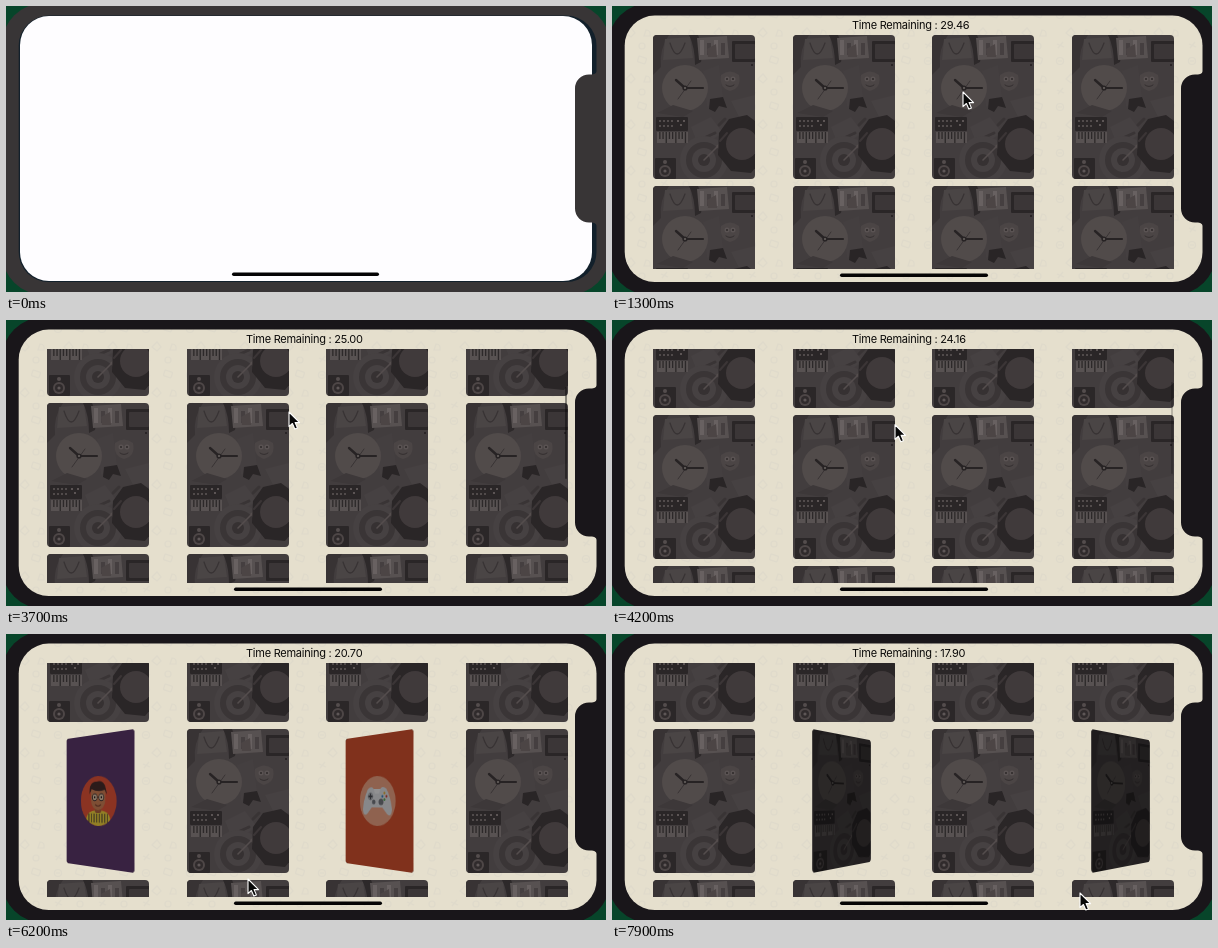
Animation, 600 px wide and 286 px high, one loop 8 s. Source, as an HTML page:

```html
<!DOCTYPE html>
<html lang="en">
<head>
<meta charset="utf-8">
<title>Memory cards</title>
<style>
html, body { margin: 0; width: 100%; height: 100%; overflow: hidden; background: #07452a; }
#stage { position: absolute; left: 0; top: 0; width: 600px; height: 286px; overflow: hidden; }
#stage > svg { position: absolute; left: 0; top: 0; }
#list { position: absolute; left: 0; top: 29px; width: 600px; height: 234px; overflow: hidden; }
#cards { position: absolute; left: 0; top: 0; }
.card { position: absolute; width: 102px; height: 144px; border-radius: 4px; overflow: hidden; }
.card svg { position: absolute; left: 0; top: 0; }
#bar { position: absolute; left: 559px; width: 2px; height: 92px; border-radius: 1px; background: #0006; }
#time { position: absolute; left: 240px; top: 12px; font: 11px/15px Inter, "Liberation Sans", sans-serif; letter-spacing: -.25px; color: #0b0a09; white-space: pre; }
</style>
</head>
<body>
<div id="stage">
  <svg width="600" height="286">
    <defs>
      <pattern id="paper" width="44" height="46" patternUnits="userSpaceOnUse">
        <rect width="44" height="46" fill="#e5dfcd"/>
        <g fill="none" stroke="#dfdacb" stroke-width="1.2">
          <circle cx="8" cy="9" r="3.5"/><path d="M6 9h4"/>
          <rect x="26" y="5" width="8" height="6" rx="1" transform="rotate(18 30 8)"/>
          <path d="M14 27l5-5 4 5-4 4z"/><path d="M34 24q5 0 4 6h-6z"/>
          <circle cx="30" cy="40" r="3"/><path d="M5 38l7 3M6 42l5-6"/>
        </g>
      </pattern>
    </defs>
    <rect id="bezel" x="-4" y="-3" width="608" height="292" rx="42"/>
    <rect id="under" x="12.7" y="9.6" width="577.8" height="266.4" rx="30"/>
  </svg>
  <div id="list"><div id="cards"></div></div>
  <div id="bar"></div>
  <div id="time"></div>
  <svg width="600" height="286">
    <rect id="white" fill="#fefdff" rx="29"/>
    <path id="notch" d="M592 62q-1 6.5-6 6.5h-3a14 14 0 0 0-14 14v120a14 14 0 0 0 14 14h3q5 0 6 6.5z"/>
    <rect id="home" height="3.4" rx="1.7" fill="#050405"/>
    <path id="cursor" d="M0 0V14.6L3.4 11.5L5.8 17L8.4 15.9L6.1 10.6H10.6Z" fill="#080808" stroke="#fff" stroke-width="1.1" stroke-linejoin="round"/>
  </svg>
</div>
<script>
const $ = id => document.getElementById(id);
const times = (n, fn) => Array.from({ length: n }, (_, i) => fn(i)).join("");
const clamp = v => Math.min(1, Math.max(0, v));
const smooth = v => v * v * (3 - 2 * v);
const disc = (x, y, r, fill) => `<circle cx="${x}" cy="${y}" r="${r}" fill="${fill}"/>`;
const box = (x, y, w, h, fill, rx = 0) => `<rect x="${x}" y="${y}" width="${w}" height="${h}" fill="${fill}" rx="${rx}"/>`;
const shape = (d, fill) => `<path d="${d}" fill="${fill}"/>`;
const line = (d, color, w = 1) => `<path d="${d}" fill="none" stroke="${color}" stroke-width="${w}" stroke-linecap="round"/>`;

const back = box(0, 0, 102, 144, "#423d3e")
  + shape("M0 0H16Q6 14 8 32L0 40Z", "#383334")
  + shape("M36 0H45Q52 14 48 27L42 30Q42 12 36 0Z", "#2d292a")
  // bag
  + shape("M12 4L37 2L40 23L10 25Z", "#4a4545") + line("M17 8Q24 30 32 8", "#383334", 1.3)
  // magazines
  + shape("M44 3L74 1L76 23L46 25Z", "#575151")
  + times(4, i => box(47 + i * 7, 5 + i % 2 * 3, 4, 15 - i % 2 * 3, i % 2 ? "#453f40" : "#686161"))
  + shape("M54 14L63 9L64 22H55Z", "#4c4545")
  // screen
  + box(79, 6, 26, 21, "#2a2627", 1) + box(82, 9, 20, 15, "#3b3637", 1) + disc(99, 30, 1, "#201d1e")
  // clock
  + shape("M50 36L66 30L70 62L54 72Z", "#443f40")
  + disc(32, 53, 23, "#514b4a") + line("M32 53L23 45", "#272324", 2.4) + line("M32 53H50", "#272324", 2.2)
  + line("M38 46L25 64", "#332e2f", .8) + disc(32, 53, 2.6, "#272324") + disc(32, 53, 1, "#6a6462")
  // face
  + shape("M68 40Q77 33 86 40Q89 53 77 56Q66 53 68 40Z", "#4b4545")
  + disc(74, 44, 2.5, "#5a5353") + disc(80, 44, 2.5, "#5a5353") + disc(74, 44, 1, "#2c2829") + disc(80, 44, 1, "#2c2829")
  + line("M73 50Q77 53 81 50", "#332e2f")
  // hat and loose sheets
  + shape("M57 64L70 62L74 73L66 71L62 77L56 74Z", "#292526")
  + shape("M4 78L20 70L40 76L30 82Z", "#3d3839") + shape("M78 66L102 60V84L86 82Z", "#464142")
  + shape("M38 92L58 82L70 98L46 112Z", "#464142") + line("M40 108L62 98M66 90L72 84", "#393435", 3)
  // target
  + disc(51, 125, 24, "#464142") + disc(51, 125, 18, "#3a3536") + disc(51, 125, 12, "#464142") + disc(51, 125, 6, "#363132")
  + line("M51 125L66 110", "#544d4d", 1.6) + shape("M63 111L69 106L71 110L66 114Z", "#544d4d")
  // ring
  + shape("M76 84L94 80L110 92V124L98 138L78 136L65 120L66 98Z", "#2a2627")
  + disc(89, 109, 16, "#403a3b") + line("M67 106L74 98", "#3b3536", 2)
  // keyboard
  + box(3, 82, 32, 14, "#2a2627", 1)
  + times(8, i => disc(7 + i % 4 * 4, 86 + (i >> 2) * 5, 1, "#5e5757")) + times(3, i => disc(25 + i * 3, 86 + i % 2 * 4, 1, "#6c6565"))
  + box(4, 97, 31, 11, "#585252") + times(9, i => box(6.2 + i * 3.2, 97, 1.3, i % 3 == 2 ? 11 : 7, "#2c2829"))
  // speaker
  + box(2, 123, 21, 21, "#2b2728", 1) + disc(12, 127, 2, "#544d4d") + disc(12, 136, 6, "#4e4747") + disc(12, 136, 4, "#302b2c") + disc(12, 136, 1.6, "#5e5757");

const face = (bg, ring, art) => box(0, 0, 102, 144, bg) + disc(51, 72, 27, ring) + art;

const chart = face("#c4bdbd", "#f9d02a",
  line("M42 82L37 93M60 82L65 93M51 82V92", "#d8452f", 2.4)
  + box(34, 59, 34, 24, "#7b848c", 1) + box(36.5, 61.5, 29, 19, "#f8f4ea")
  + box(39, 66, 4, 12, "#36a8b2") + box(45, 70, 4, 8, "#e2533c") + box(51, 67, 4, 11, "#445562")
  + line("M58 66H63M58 70H63M58 74H62", "#d9a552", 1.2) + disc(51, 58, 1.8, "#7b848c"));

const target = face("#2b7ab9", "#e84a32",
  disc(51, 72, 22.5, "#c43a26") + disc(51, 72, 18, "#ec5038") + disc(51, 72, 13, "#c43a26") + disc(51, 72, 8, "#ec5038") + disc(51, 72, 3, "#c43a26")
  + line("M51 72L70 53", "#f4f1ea", 2.4) + shape("M65 58L66 50L73 44L73 51L80 51L73 58Z", "#f7cf5e") + line("M68 55L76 48", "#fff6e4", 1.3));

const boy = face("#613a70", "#f0583a",
  shape("M33 92Q34 82 51 82Q68 82 69 92Q61 99 51 99Q41 99 33 92Z", "#fbdc40")
  + times(8, i => line(`M${37 + i * 4} 86V95`, "#40363a", 1.2))
  + box(46, 76, 10, 9, "#b8683f", 3) + shape("M40 61Q51 53 62 61V70Q61 81 51 82Q41 81 40 70Z", "#d98759")
  + shape("M38 65Q37 50 49 51Q62 48 64 65L61 60Q51 63 41 59Z", "#4a2e2c")
  + `<g fill="#f4d6b4" stroke="#403538" stroke-width="1.1"><circle cx="46" cy="68" r="3.7"/><circle cx="56" cy="68" r="3.7"/></g>`
  + line("M49.7 68H52.3", "#403538") + disc(46, 68, 1.2, "#30262a") + disc(56, 68, 1.2, "#30262a") + line("M47 76Q51 79 55 76", "#7a3b2a", 1.2));

const pad = face("#dc5531", "#f6a888",
  shape("M37 59Q43 55 46 59H56Q59 55 65 59Q71 68 73 81Q72 90 66 86L59 79H43L36 86Q30 90 29 81Q31 68 37 59Z", "#e9eaee")
  + shape("M46 59H56L54 64H48Z", "#fafafc") + disc(41, 67, 4.4, "#b2b4ba") + line("M38.5 67H43.5M41 64.5V69.5", "#4c4d54", 1.8)
  + disc(57, 73, 3.6, "#7b7d84") + disc(46, 73, 2.6, "#7b7d84")
  + disc(62, 63.5, 1.5, "#f0b640") + disc(65, 67, 1.5, "#d8483f") + disc(59, 67, 1.5, "#3f8cc8") + disc(62, 70.5, 1.5, "#62b263"));

const faces = { 1: chart, 2: target, 4: boy, 5: target, 6: pad, 7: chart };
const svg = art => `<svg width="102" height="144">${art}</svg>`;
const cards = Array.from({ length: 12 }, (_, i) => {
  const el = document.createElement("div");
  el.className = "card";
  el.style.left = 41 + i % 4 * 139.7 + "px";
  el.style.top = (i >> 2) * 151 + "px";
  el.innerHTML = svg(back) + (faces[i] ? svg(faces[i]) : "");
  $("cards").append(el);
  return el;
});

// [first card, tapped at, second card, tapped at]: both close a moment after the second tap
const rounds = [[2, 1650, 1, 2570], [6, 5250, 4, 5865], [5, 6680, 7, 7510]];
const FLIP = 170, WAIT = 280;

// [time, x, y]
const pointer = [
  [0, 430, 300], [700, 430, 300], [1300, 351, 86], [1650, 350, 92], [1850, 348, 94], [2450, 238, 116], [2620, 238, 118],
  [2900, 266, 220], [3250, 281, 189], [3700, 283, 92], [4000, 283, 104], [4300, 283, 105], [4800, 273, 195],
  [5200, 356, 184], [5350, 356, 184], [5800, 104, 186], [5900, 104, 187], [6200, 242, 245], [6600, 236, 190],
  [6760, 236, 190], [7400, 500, 184], [7550, 500, 186], [7900, 468, 259]
];
const scroll = [[0, 0], [3250, 0], [3700, 97], [4000, 85]];
const clock = [[1010, 30], [1300, 29.46], [2900, 26.45], [3700, 25], [4800, 23.15], [6200, 20.7], [7900, 17.9]];

function at(keys, t, ease = v => v) {
  if (t <= keys[0][0]) return keys[0].slice(1);
  const i = keys.findIndex(k => k[0] > t);
  if (i < 0) return keys.at(-1).slice(1);
  const a = keys[i - 1], b = keys[i];
  const p = ease((t - a[0]) / (b[0] - a[0]));
  return a.slice(1).map((v, n) => v + (b[n + 1] - v) * p);
}

// open: 0 shows the back, 1 the face; the card dims while it is edge-on
function turn(card, open) {
  const a = 180 * (1 - open);
  const front = a < 90;
  const tilt = a % 180 ? Math.sin(a * Math.PI / 180) : 0;
  card.lastChild.style.visibility = front ? "visible" : "hidden";
  card.style.filter = tilt ? `brightness(${1 - .6 * tilt})` : "none";
  card.style.transform = tilt
    ? `perspective(436px) translateZ(${-51 * tilt}px) rotateY(${front ? -a : 180 - a}deg)` : "none";
}

function attrs(el, values) {
  for (const k in values) el.setAttribute(k, values[k]);
}

function draw(t) {
  const wake = clamp(t / 600), grow = 1 - (1 - wake) ** 3;
  const mix = (a, b) => Math.round(a + (b - a) * wake);
  const dark = `rgb(${mix(56, 25)},${mix(53, 22)},${mix(54, 26)})`;
  $("bezel").setAttribute("fill", dark);
  $("notch").setAttribute("fill", dark);
  $("under").setAttribute("fill", wake < 1 ? "#12202b" : "url(#paper)");
  attrs($("white"), {
    x: 14 - 1.3 * grow, y: 10 - .4 * grow, width: 572 + 5.8 * grow, height: 265 + 1.4 * grow,
    opacity: 1 - clamp((t - 720) / 160)
  });
  attrs($("home"), { x: 226 + 2 * grow, y: 266.5 + grow, width: 147 + grow });

  const [y] = at(scroll, t, smooth);
  $("cards").style.transform = `translateY(${-y}px)`;
  $("bar").style.top = 29 + y * .392 + "px";
  $("bar").style.opacity = clamp((t - 3200) / 100) * clamp((4300 - t) / 200);
  const eased = from => smooth(clamp((t - from) / FLIP));
  for (const [a, tapA, b, tapB] of rounds) {
    const closed = eased(tapB + WAIT);
    turn(cards[a], eased(tapA) - closed);
    turn(cards[b], eased(tapB) - closed);
  }

  $("time").textContent = "Time Remaining : " + at(clock, t)[0].toFixed(2);
  $("cursor").setAttribute("transform", `translate(${at(pointer, t, smooth)})`);
}

const start = performance.now();
function tick() {
  draw(Math.floor((performance.now() - start) % 8000 / 100) * 100);
  requestAnimationFrame(tick);
}
tick();
</script>
</body>
</html>
```
